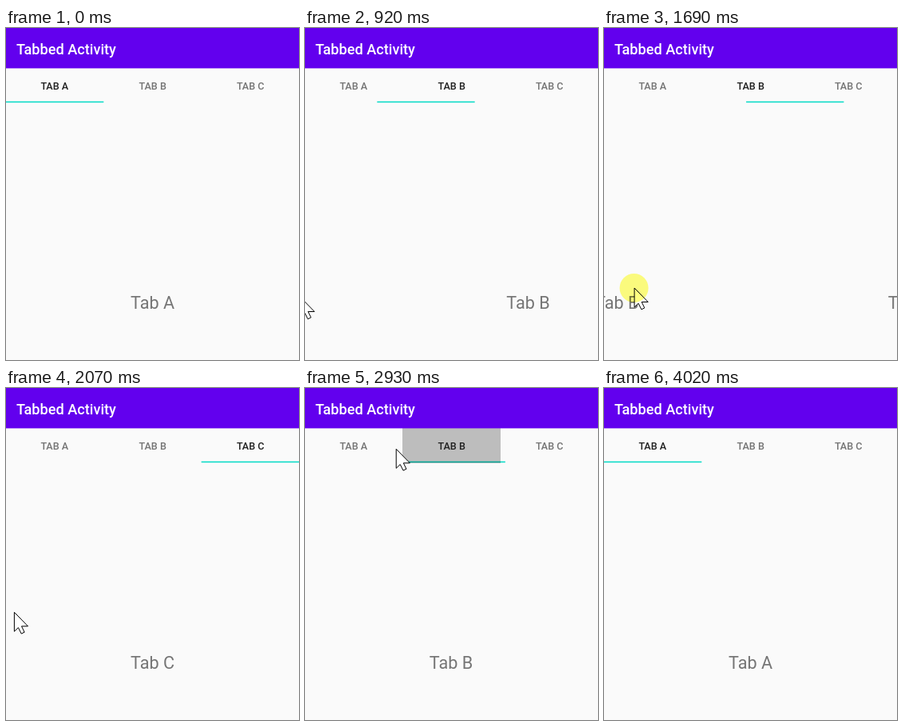
These frames come from a looping animation (367 by 415 pixels, 5110 ms). An HTML page:

```html
<!DOCTYPE html>
<html lang="en">
<head>
<meta charset="utf-8">
<title>Tabbed Activity</title>
<style>
  html, body { margin: 0; width: 100%; height: 100%; overflow: hidden; background: #fafafa; }
  svg { display: block; width: 367px; height: 415px; }
  text { font-family: Roboto, "Open Sans", sans-serif; }
  .title { font-size: 18.15px; font-weight: 500; fill: #fff; }
  .tab { font-size: 12.6px; font-weight: 500; fill: #757575; text-anchor: middle; }
  .tab.on { fill: #212121; }
  .page { font-size: 21.6px; fill: #757575; text-anchor: middle; }
  #press { fill: #ffff80; mix-blend-mode: multiply; }
</style>
</head>
<body>
<svg viewBox="0 0 367 415">
  <defs>
    <clipPath id="tabA"><rect y="50" width="122" height="44"/></clipPath>
    <clipPath id="tabB"><rect x="122" y="50" width="123" height="44"/></clipPath>
  </defs>
  <rect width="367" height="415" fill="#fafafa"/>
  <g id="pages">
    <text class="page" x="183.5" y="351">Tab A</text>
    <text class="page" x="550.5" y="351">Tab B</text>
    <text class="page" x="917.5" y="351">Tab C</text>
  </g>
  <rect id="line" y="91.7" width="122.3" height="1.5" fill="#03dac5"/>
  <g clip-path="url(#tabB)"><circle id="rippleB" cx="185" cy="73"/></g>
  <g clip-path="url(#tabA)"><circle id="rippleA" cx="58.5" cy="72"/></g>
  <text class="tab" x="60.8" y="77">TAB A</text>
  <text class="tab" x="183.7" y="77">TAB B</text>
  <text class="tab" x="306.2" y="77">TAB C</text>
  <rect width="367" height="50.4" fill="#6200ee"/>
  <text class="title" x="12.9" y="32.7">Tabbed Activity</text>
  <path id="arrow" d="M.5 .5V24.5L5.5 19.7L9.3 27.3L13.2 25.4L9.6 18H17.6Z" fill="#fff" stroke="#000"/>
  <circle id="press" r="18" cy=".5"/>
</svg>
<script>
  const LOOP = 5110, FIRST = 300, LAST = 4000, STEP = 77.2;
  const PAGE = 367, TAB = PAGE / 3;
  const el = id => document.getElementById(id);
  const tabs = document.querySelectorAll('.tab');

  const clamp = x => Math.min(1, Math.max(0, x));
  const smooth = x => x * x * (3 - 2 * x);
  const easeOut = x => 1 - (1 - x) ** 3;
  const fastOutSlowIn = x => 1 - (1 - x ** 1.7) ** 3.3;

  // A swipe moves page and line together; a tap lets each follow its own curve.
  const swipe = (start, time, by, down, up) =>
    ({ start, by, down, up, page: x => smooth(clamp(x / time)), line: x => smooth(clamp(x / time)) });
  const tap = (start, by, down) =>
    ({ start, by, down, up: start, page: x => easeOut(clamp(x / 260)), line: x => fastOutSlowIn(clamp(x / 312)) });

  const tapB = 2695, tapA = 3385;
  const moves = [
    swipe(500, 628, 1, 450, 835),
    swipe(1540, 318, 1, 1530, 1760),
    tap(tapB, -1, 2615),
    tap(tapA, -1, 3170)
  ];
  const position = (part, t) => moves.reduce((sum, m) => sum + m.by * m[part](t - m.start), 0);

  // Pointer stops: time, x, y
  const stops = [
    [300, 285, 382], [460, 285, 340], [918, -6, 336.5], [1380, 267, 324], [1535, 267, 324],
    [1690, 37, 324.5], [1900, -30, 324], [2450, 193, 77], [2700, 193, 77],
    [3080, 59, 75], [3465, 61, 77], [3928, 143, 284]
  ];

  function pointerAt(t) {
    const i = stops.findLastIndex(s => s[0] <= t);
    const [t0, x0, y0] = stops[Math.max(0, i)];
    const [t1, x1, y1] = stops[Math.min(stops.length - 1, i + 1)];
    const f = t1 > t0 ? clamp((t - t0) / (t1 - t0)) : 0;
    return [x0 + (x1 - x0) * f, y0 + (y1 - y0) * f];
  }

  function drawRipple(node, age) {
    node.setAttribute('r', 20 + .456 * Math.max(0, age));
    node.setAttribute('fill-opacity', age < 0 ? 0 : .245 * clamp((380 - age) / 100));
  }

  function place(node, [x, y], shown) {
    node.setAttribute('transform', `translate(${x} ${y})`);
    node.setAttribute('display', shown ? 'inline' : 'none');
  }

  function draw(t) {
    const page = position('page', t);
    el('pages').setAttribute('transform', `translate(${-PAGE * page} 0)`);
    el('line').setAttribute('x', TAB * position('line', t));
    tabs.forEach((tab, i) => tab.classList.toggle('on', i === Math.round(Math.abs(page))));
    drawRipple(el('rippleB'), t - tapB);
    drawRipple(el('rippleA'), t - tapA);
    const tip = pointerAt(t);
    place(el('arrow'), tip, t >= FIRST && t < LAST);
    place(el('press'), tip, moves.some(m => t >= m.down && t < m.up));
  }

  const snap = t => t < FIRST ? 0 : FIRST + Math.floor((t - FIRST) / STEP) * STEP;

  const start = performance.now();
  function frame() {
    draw(snap((performance.now() - start) % LOOP));
    requestAnimationFrame(frame);
  }
  frame();
</script>
</body>
</html>
```
